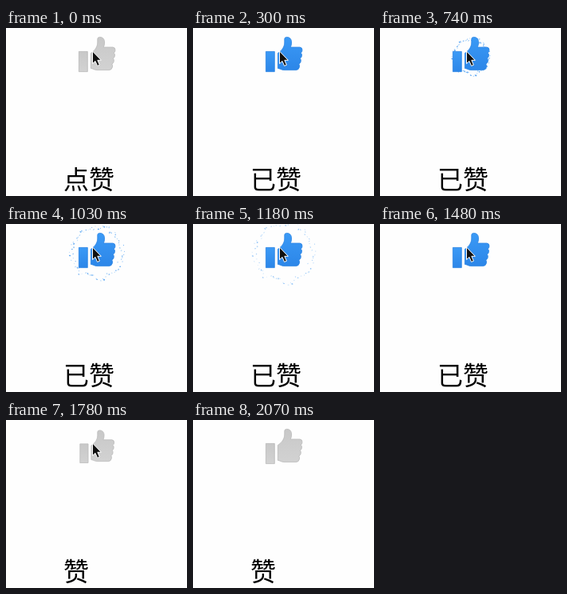
Animation, 227 px wide and 210 px high, one loop 2.65 s. Source, as an HTML page:

```html
<!DOCTYPE html>
<html lang="zh-CN">
<head>
<meta charset="utf-8">
<style>
  html, body { margin: 0; width: 100%; height: 100%; overflow: hidden; background: #fefefe; }
  svg { display: block; width: 100%; height: 100%; }
  text { font: 300 32px "Noto Sans CJK SC", "Noto Sans CJK", sans-serif; fill: #000; }
</style>
</head>
<body>
<svg viewBox="0 0 227 210">
  <defs>
    <linearGradient id="blue" x2="0" y2="1">
      <stop offset="0" stop-color="#3b9af6"/><stop offset="1" stop-color="#2c86e8"/>
    </linearGradient>
    <linearGradient id="gray" x2="0" y2="1">
      <stop offset="0" stop-color="#c8c8c8"/><stop offset="1" stop-color="#d2d2d2"/>
    </linearGradient>
  </defs>
  <g id="sparks"></g>
  <g id="thumb" stroke-width=".8" stroke-linejoin="round">
    <path d="M91.4 29.4H102.3V54.6H91.4Z"/>
    <path d="M106.4 31.5C111 28.5 114.8 24 114.8 18V13.5Q115 11.4 117.5 11.4C121.5 11.4 123.6 14 123.6 18
      Q123.6 21 122.4 24H134Q137 24.3 137 27.5Q137 30 135.2 31.2Q137 32.4 136.4 35Q136 37.4 134.2 38
      Q135.8 39.4 135.2 42Q134.7 44.2 132.8 45Q134 46.4 133.4 49Q132.6 52.6 129 52.6H115
      C111 52.6 109.5 50.8 106.4 50.4Z"/>
  </g>
  <path id="cursor" d="M108.5 29V44.6L112 41.4L114.6 47.4L117.4 46.2L114.8 40.3H119.4Z" fill="#111" stroke="#fff" stroke-width="1"/>
  <text id="label" x="72" y="200.5"></text>
</svg>
<script>
const LOOP = 2650;
const CENTER = { x: 114, y: 36 };
const PIVOT = { x: 114.8, y: 37.2 };
const BLUES = ['#4b9df2', '#83bdf6', '#b4d8fa'];
const $ = id => document.getElementById(id);
const thumb = $('thumb');

// Each pose holds until the next: start time, scale, spark radius.
const poses = [
  [0, 1, 0], [300, 1, 0], [440, 1.42, 0], [590, .94, 0],
  [740, 1, 25], [880, 1, 30], [1030, 1, 36], [1180, 1, 41.5], [1330, 1, 45.5],
  [1480, 1, 0], [1780, .94, 0], [1930, .9, 0], [2070, 1, 0]
];

let seed = 17;
const random = () => (seed = seed * 16807 % 2147483647) / 2147483647;

const sparks = Array.from({ length: 76 }, (_, i) => {
  const dot = document.createElementNS('http://www.w3.org/2000/svg', 'ellipse');
  dot.setAttribute('rx', .5 + random() * .7);
  dot.setAttribute('ry', .4 + random() * .5);
  dot.setAttribute('fill', BLUES[i % BLUES.length]);
  $('sparks').append(dot);
  return { dot, angle: (i + random()) / 76 * 2 * Math.PI, reach: .78 + random() * .2, turn: random() * 180 };
});

function draw(time) {
  const [, scale, radius] = poses.findLast(pose => pose[0] <= time);
  const liked = time >= 300 && time < 1780;

  thumb.setAttribute('transform',
    `translate(${PIVOT.x} ${PIVOT.y}) scale(${scale}) translate(${-PIVOT.x} ${-PIVOT.y})`);
  thumb.setAttribute('fill', liked ? 'url(#blue)' : 'url(#gray)');
  thumb.setAttribute('stroke', liked ? '#2b84e4' : '#b9b9b9');

  $('label').textContent = time < 300 ? '点赞' : liked ? '已赞' : '赞';
  $('cursor').style.display = time < 2070 ? '' : 'none';

  $('sparks').style.display = radius ? '' : 'none';
  $('sparks').style.opacity = Math.min(1, (52 - radius) / 18);
  for (const { dot, angle, reach, turn } of sparks) {
    const x = CENTER.x + radius * reach * Math.cos(angle);
    const y = CENTER.y + radius * reach * Math.sin(angle);
    dot.setAttribute('transform', `translate(${x} ${y}) rotate(${turn})`);
  }
}

const start = performance.now();
function tick() {
  draw((performance.now() - start) % LOOP);
  requestAnimationFrame(tick);
}
tick();
</script>
</body>
</html>
```
